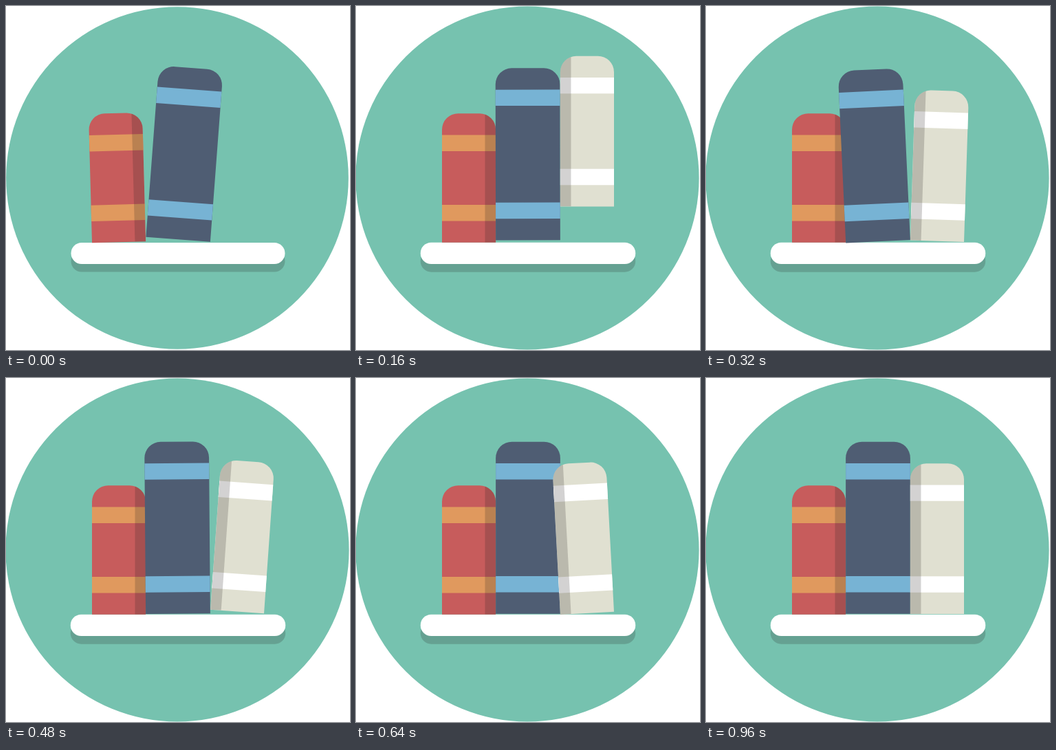
Animation of 500x500 px, one loop 1.2 s. Source, as an HTML page:

```html
<!DOCTYPE html>
<html lang="en">
<head>
<meta charset="utf-8">
<title>Books on a shelf</title>
<style>
  html, body { margin: 0; width: 100%; height: 100%; overflow: hidden; background: #fff; }
  svg { display: block; width: 100%; height: 100%; }
</style>
</head>
<body>
<svg viewBox="0 0 500 500">
  <circle id="disc" cx="249" cy="250" r="249.6" fill="#76c2af"/>
  <g id="shelf">
    <rect x="-156.25" y="-4" width="312.5" height="31.25" rx="15.6" fill="#231f20" opacity=".2"/>
    <path d="M-156.25 0h312.5v11.4h-312.5z" fill="#231f20" opacity="0"/>
    <rect x="-156.25" y="-15.6" width="312.5" height="31.25" rx="15.6" fill="#fff"/>
  </g>
  <g id="books"></g>
</svg>
<script>
const LOOP = 1200, TICK = 40, LAG = 400, UNIT = 7.8125;
const $ = id => document.getElementById(id);

const ease = {
  linear: p => p,
  in: p => 1 - Math.cos(p * Math.PI / 2),
  out: p => Math.sin(p * Math.PI / 2),
  both: p => (1 - Math.cos(p * Math.PI)) / 2
};

// Each stop: time, value, easing used to reach it
const drop = [[0, -148.5], [245, 0, 'linear']];
const tilt = [[240, 0], [320, 1.85, 'in'], [440, 4.7, 'out'], [560, -0.1, 'in'],
              [640, -3.1, 'out'], [960, 0, 'both']];
const hop = [[400, 0], [560, -2.5, 'in'], [640, -3.1, 'out'], [960, 0, 'both']];
const grow = [[0, 0], [160, 1, 'linear']];

function at(track, t) {
  if (t <= track[0][0]) return track[0][1];
  for (let i = 1; i < track.length; i++) {
    const [t0, v0] = track[i - 1], [t1, v1, kind] = track[i];
    if (t < t1) return v0 + (v1 - v0) * ease[kind]((t - t0) / (t1 - t0));
  }
  return track[track.length - 1][1];
}

// Sizes in grid units; the bottom right corner is the pivot
const books = [
  { right: 26, w: 10, h: 24, base: 343.75, fill: '#c75c5c', band: '#e0995e', shade: -2, lead: 2 * LAG },
  { right: 38, w: 12, h: 32, base: 342.75, fill: '#4f5d73', band: '#77b3d4', lead: LAG },
  { right: 48, w: 10, h: 28, base: 342.9, fill: '#e0e0d1', band: '#fff', shade: -10, lead: 0 }
];

function bookMarkup({ w, h, fill, band, shade }, i) {
  const body = `M0 0H${-w}V${3 - h}a3 3 0 0 1 3-3H-3a3 3 0 0 1 3 3z`;
  const stripe = y => `<path d="M0 ${y}h${-w}v3h${w}z" fill="${band}"/>`;
  const side = shade === undefined ? '' :
    `<clipPath id="clip${i}"><path d="${body}"/></clipPath>
     <rect x="${shade}" y="${-h}" width="2" height="${h}" fill="#231f20" opacity=".2" clip-path="url(#clip${i})"/>`;
  return `<g><path d="${body}" fill="${fill}"/>${stripe(4 - h)}${stripe(-7)}${side}</g>`;
}

$('books').innerHTML = books.map(bookMarkup).join('');
books.forEach((b, i) => b.node = $('books').children[i]);

function draw(t) {
  for (const b of books) {
    const s = t + b.lead;
    const y = b.base + at(drop, s) + at(hop, s);
    b.node.setAttribute('visibility', s < TICK ? 'hidden' : 'visible');
    b.node.setAttribute('transform',
      `translate(${b.right * UNIT} ${y}) rotate(${at(tilt, s)}) scale(${UNIT})`);
  }
  const g = at(grow, t);
  $('disc').setAttribute('r', 248.8 + 0.8 * g);
  $('shelf').setAttribute('transform', `translate(250 359.4) scale(${0.995 + 0.005 * g})`);
}

// The motion advances at 25 pictures a second
let start;
function frame(now) {
  start ??= now;
  draw(Math.floor((now - start) % LOOP / TICK) * TICK);
  requestAnimationFrame(frame);
}
draw(0);
requestAnimationFrame(frame);
</script>
</body>
</html>
```
